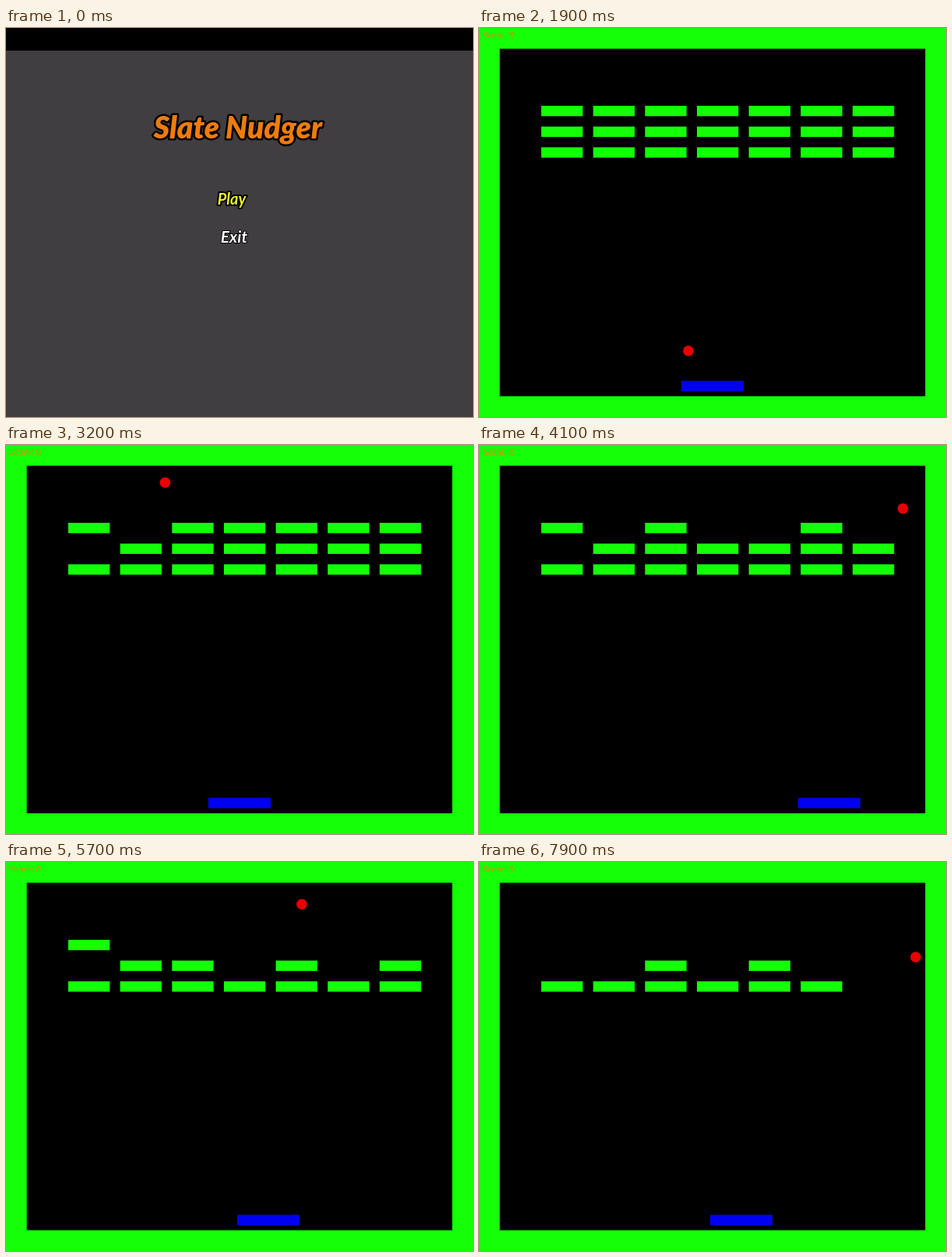
Write an HTML page with a canvas that moves like this. It is 600 px wide and 500 px high and loops after 8 s.

```html
<!DOCTYPE html>
<html lang="en">
<head>
<meta charset="utf-8">
<title>Slate Nudger</title>
<style>
  html, body { margin: 0; width: 100%; height: 100%; overflow: hidden; background: #000; }
  canvas { display: block; }
</style>
</head>
<body>
<canvas id="stage" width="600" height="500"></canvas>
<script>
const ctx = document.getElementById('stage').getContext('2d');
const LOOP = 8000, TICK = 100, GAME_START = 1900, SPEED_UP = 5400;
const GREEN = '#14ff08', COLS = 7, ROWS = 3;
const LEFT = 34, RIGHT = 566, TOP = 33;

// The ball always flies at 45 degrees, so x and y are two zigzags over the same distance.
const xStops = [269, LEFT, 77, LEFT, RIGHT, 460, RIGHT, 275, RIGHT, 150.5, RIGHT];
const yStops = [415];
const drop = n => n < 4 ? 62.3 : n < 7 ? 100.3 : 90;
for (let n = 0; n < 13; n++) yStops.push(TOP, TOP + drop(n));
yStops.push(TOP);

// Bricks (row * COLS + column) broken at side turns and at downward bounces.
const sideBreaks = [7, 5, 2, 0];
const topBreaks = [1, 3, 4, 6, null, 12, 10, 13, null, null, 8, null, 20];

function zigzag(stops, distance) {
  let i = 0, leg;
  while (distance >= (leg = Math.abs(stops[i + 1] - stops[i]))) {
    distance -= leg;
    i++;
  }
  return { value: stops[i] + Math.sign(stops[i + 1] - stops[i]) * distance, turns: i };
}

const ramp = (t, from, to) => Math.min(1, Math.max(0, (t - from) / (to - from)));

function rect(color, x, y, w, h) {
  ctx.fillStyle = color;
  ctx.fillRect(x, y, w, h);
}

function label(text, x, y, font, color, outline) {
  ctx.font = font + ' Lato, sans-serif';
  ctx.textAlign = 'center';
  ctx.lineJoin = 'round';
  if (outline) {
    ctx.lineWidth = outline;
    ctx.strokeStyle = '#000';
    ctx.strokeText(text, x, y);
  }
  ctx.fillStyle = color;
  ctx.fillText(text, x, y);
}

function drawMenu(t) {
  rect('#413e41', 0, 0, 600, 500);
  if (t < TICK) rect('#000', 0, 0, 600, 29);
  label('Slate Nudger', 298, 142, 'italic 900 39px', '#ef7c0b', 5);
  label('Play', 290, 227, 'italic bold 20px', '#eaf52a', 4);
  label('Exit', 293, 276, 'italic bold 21px', '#fff', 2);
}

function drawGame(t) {
  rect(GREEN, 0, 0, 600, 500);
  rect('#000', 26.67, 26.67, 546.67, 446.67);
  label('Score: 0', 25, 13, 'italic 12px', '#d09010');

  const distance = 0.378 * (Math.min(t, SPEED_UP) - GAME_START)
    + 0.46 * Math.max(0, t - SPEED_UP);
  const x = zigzag(xStops, distance), y = zigzag(yStops, distance);

  const sideHits = xStops.slice(1, x.turns + 1).filter(s => s !== LEFT && s !== RIGHT).length;
  const broken = new Set([
    ...sideBreaks.slice(0, sideHits),
    ...topBreaks.slice(0, Math.floor(y.turns / 2))
  ]);
  for (let i = 0; i < ROWS * COLS; i++) {
    if (broken.has(i)) continue;
    const col = i % COLS, row = Math.floor(i / COLS);
    rect(GREEN, 80 + col * 66.67, 100 + row * 26.67, 53.33, 13.33);
  }

  const paddle = 260 + 150 * ramp(t, 3700, 4100) - 113 * ramp(t, 4200, 4500);
  rect('#0000f2', paddle, 453.5, 80, 13.3);

  ctx.fillStyle = '#ea0000';
  ctx.beginPath();
  ctx.arc(x.value, y.value, 6.8, 0, Math.PI * 2);
  ctx.fill();
}

function frame() {
  const t = Math.floor(performance.now() % LOOP / TICK) * TICK;
  if (t < GAME_START) drawMenu(t); else drawGame(t);
  requestAnimationFrame(frame);
}
frame();
</script>
</body>
</html>
```
